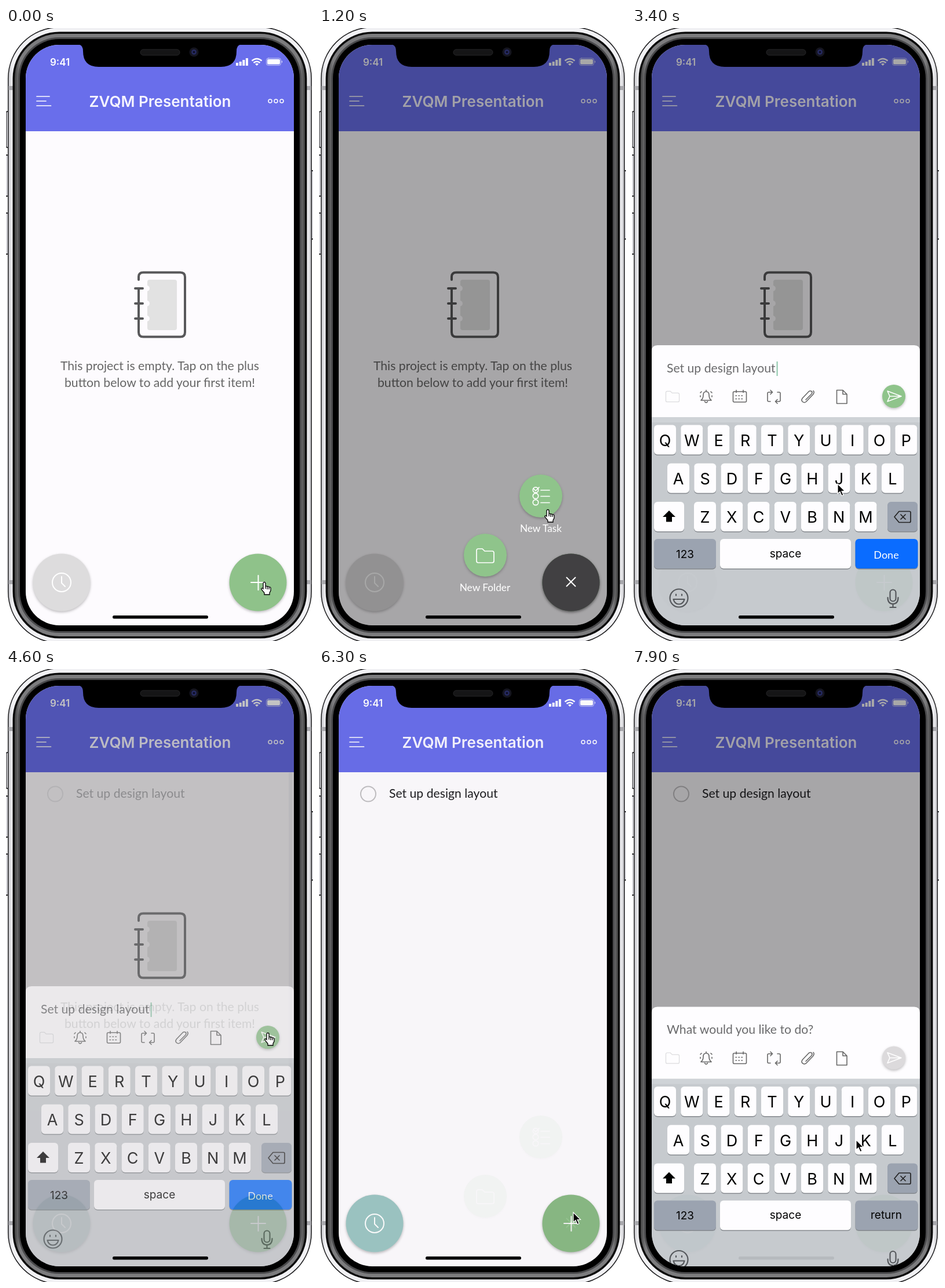
An HTML page that plays this animation: 530 px wide and 1057 px high, repeating every 8000 ms.

```html
<!DOCTYPE html>
<html lang="en">
<head>
<meta charset="utf-8">
<title>Add a task</title>
<style>
html, body { margin: 0; width: 100%; height: 100%; overflow: hidden; background: #fff; }
svg { display: block; width: 530px; height: 1057px; }
text { font: 21.2px Lato, sans-serif; white-space: pre; }
.mid { text-anchor: middle; }
.ui { font-family: Inter, sans-serif; }
.key { font-size: 27px; }
.small { font-size: 19px; }
.label { font-size: 17.3px; fill: #fff; }
.line { fill: none; stroke-width: 2; stroke-linecap: round; stroke-linejoin: round; }
.white { stroke: #fff; }
.thin { stroke-width: 1.6; stroke: #666; }
.lift { filter: drop-shadow(0 2px 2px rgba(0, 0, 0, .25)); }
</style>
</head>
<body>
<svg viewBox="0 0 530 1057">
  <defs>
    <clipPath id="glass"><rect x="34" y="29" width="463" height="1001" rx="58"/></clipPath>
    <linearGradient id="steel">
      <stop offset="0" stop-color="#c9c9cd"/><stop offset=".012" stop-color="#f1f1f4"/>
      <stop offset=".988" stop-color="#f1f1f4"/><stop offset="1" stop-color="#c9c9cd"/>
    </linearGradient>
    <linearGradient id="band">
      <stop offset="0" stop-color="#444"/><stop offset=".018" stop-color="#7c7c7e"/>
      <stop offset=".982" stop-color="#7c7c7e"/><stop offset="1" stop-color="#444"/>
    </linearGradient>
    <path id="folderIcon" d="M-15-9a3 3 0 0 1 3-3h7l4 4h13a3 3 0 0 1 3 3v14a3 3 0 0 1-3 3h-24a3 3 0 0 1-3-3z"/>
    <rect id="homeBar" x="184" y="1013" width="165" height="5.5" rx="2.7"/>
  </defs>

  <g id="body"></g>

  <g clip-path="url(#glass)">
    <rect x="34" y="29" width="463" height="1001" fill="#fdfbfe"/>
    <rect x="34" y="29" width="463" height="149" fill="#696eeb"/>
    <text class="ui" x="76" y="65" style="font-size:17px;font-weight:600" fill="#fff">9:41</text>
    <path d="M397 65v-5h4v5zM402.700 65v-7h4v7zM408.300 65v-10h4v10zM413.900 65v-13h4v13z" fill="#fff"/>
    <g class="line white" style="stroke-linecap:butt;stroke-width:2.600">
      <path d="M424.500 56.500q8.500-7 17 0M427.500 60q5.500-4.500 11 0"/>
      <path d="M433 65l-3-3q3-2 6 0z" fill="#fff" stroke="none"/>
    </g>
    <rect x="449.500" y="52" width="25" height="12.500" rx="3.500" class="line white" style="stroke-width:1" opacity=".6"/>
    <path d="M453 53.700h18q2 0 2 2v5q0 2-2 2h-18q-2 0-2-2v-5q0-2 2-2zM476 56q2 2 0 4.500z" fill="#fff"/>
    <path class="line white" style="stroke-width:1.700" d="M53 118h22M53 126h16M53 134h24.500"/>
    <g class="line white" style="stroke-width:1.500">
      <circle cx="456" cy="126" r="3"/><circle cx="466" cy="126" r="3"/><circle cx="476" cy="126" r="3"/>
    </g>
    <text class="ui mid" x="266" y="135.500" style="font-size:26px;font-weight:600" fill="#f6f4ff">ZVQM Presentation</text>

    <g id="empty">
      <rect x="244" y="434" width="51" height="87" rx="4" fill="#e2e2e2"/>
      <g fill="#fdfbfe"><circle cx="243" cy="449" r="5"/><circle cx="243" cy="475" r="5"/><circle cx="243" cy="501" r="5"/></g>
      <path class="line" stroke="#58585a" style="stroke-width:4" d="M229 434v-5q0-7.500 8-7.500h64q8 0 8 8v95q0 8-8 8h-64q-8 0-8-8v-75M223 449h13M223 475h13M223 501h13"/>
      <g class="mid" fill="#666">
        <text x="265.500" y="590">This project is empty. Tap on the plus</text>
        <text x="265.500" y="619">button below to add your first item!</text>
      </g>
    </g>

    <g id="list">
      <circle cx="85" cy="215.500" r="13" class="line" stroke="#c2c0c3"/>
      <text x="121" y="222" fill="#1d1d20">Set up design layout</text>
      <rect id="scroll" x="488" y="178" width="6" height="553" rx="3" fill="#dedde1"/>
    </g>

    <g class="lift">
      <circle cx="96" cy="956" r="49.500" fill="#dddcdd"/>
      <circle id="clock" cx="96" cy="956" r="49.500" fill="#9dc6c4"/>
    </g>
    <path class="line white" d="M80 956a16 16 0 1 1 32 0a16 16 0 1 1-32 0M96 946v11l6 6"/>
    <circle cx="435" cy="956" r="49.500" fill="#8fc28a" class="lift"/>
    <path class="line white" d="M423 956h25M435.500 944v25"/>
    <use href="#homeBar"/>

    <rect id="dim" x="34" y="29" width="463" height="1001" opacity="0"/>

    <g id="menu">
      <g class="lift">
        <circle cx="435" cy="956" r="49.500" fill="#414042"/>
        <circle cx="383" cy="807" r="37" fill="#8fc48b"/>
        <circle cx="287" cy="909" r="37" fill="#8fc48b"/>
      </g>
      <g class="line white">
        <path d="M427.500 947.500l15 15M442.500 947.500l-15 15"/>
        <g style="stroke-width:1.700">
          <circle cx="374" cy="796.500" r="4.700"/><circle cx="374" cy="807" r="4.700"/><circle cx="374" cy="818" r="4.700"/>
          <path d="M371 795l3 3 6-6M383 797h15M383 807.500h15M383 818.500h15"/>
          <use href="#folderIcon" x="287" y="910"/>
        </g>
      </g>
      <text class="label mid" x="383" y="869">New Task</text>
      <text class="label mid" x="286.500" y="971">New Folder</text>
    </g>

    <g id="panel">
      <path d="M34 680V557q0-10 10-10h443q10 0 10 10v123z" fill="#fefdff"/>
      <rect x="34" y="671" width="463" height="480" fill="#cacfd3" opacity=".9"/>
      <text id="entry" x="60" y="593.500" fill="#69696b"></text>
      <rect id="caret" y="575" width="2" height="25" fill="#8cc6aa"/>
      <g class="line thin">
        <use href="#folderIcon" transform="translate(70 635.500) scale(.77)" stroke="#dcdcde"/>
        <path d="M119 642q4-3 4-9q0-6 5-6t5 6q0 6 4 9zM125.500 644q2.500 4 5 0M128 627v-2.500M120 627l-2 2M136 627l2 2M118 634v2M138 634v2"/>
        <rect x="174.500" y="627" width="23" height="18" rx="2"/>
        <path d="M180 624.500v4M192 624.500v4"/>
        <path d="M179 634h15M179 639.500h15" stroke-dasharray="1.500 3.500"/>
        <path d="M248 644h6q2 0 2-2v-12q0-2-2-2h-3M242 628h-6q-2 0-2 2v12q0 2 2 2h3M239 624.500l3.500 3.500-3.500 3.500M251 640.500l-3.500 3.500 3.500 3.500"/>
        <path d="M300 641l10-10q2-3 0-4.500t-4.500 0l-11 11.500q-3 4 0 6.500t6 0l12-12.500q3-4 .5-6.500"/>
        <path d="M353.500 624.500h10.500l7 7v16h-17.500zM364 624.500v7h7"/>
      </g>
      <circle id="send" cx="452" cy="635" r="20" class="lift"/>
      <path class="line white" style="stroke-width:1.600" d="M441 626l24 9-24 9 4-9zM445 635h20"/>
      <g id="keys"></g>
      <path d="M64 832l11 11h-6v8.500h-10v-8.500h-6z"/>
      <path class="line" stroke="#222" style="stroke-width:1.700" d="M453 843l8-9.500h18q2 0 2 2v15q0 2-2 2h-18zM464 839l8 8M472 839l-8 8"/>
      <text class="ui small mid" x="91.500" y="914">123</text>
      <text class="ui small mid" x="265" y="912.500">space</text>
      <text id="action" class="mid" x="439"></text>
      <g class="line" stroke="#55585c" style="stroke-width:2.200">
        <circle cx="81" cy="983" r="15.500"/>
        <path d="M71.500 985h19q-2 8.500-9.500 8.500t-9.500-8.500zM76 976.500v2M86 976.500v2"/>
        <rect x="445.500" y="968.500" width="10" height="20" rx="5"/>
        <path d="M441.500 982q0 11 9 11t9-11M450.500 993v6M445.500 999h10"/>
      </g>
      <use href="#homeBar"/>
    </g>
  </g>

  <path d="M126 28.500Q133 30 133 40Q133 67 160 67H371Q398 67 398 40Q398 30 405 28.500z"/>
  <rect x="232" y="37" width="68" height="10" rx="5" fill="#151516" stroke="#262628"/>
  <circle cx="324.500" cy="41.500" r="8" fill="#15151f"/>
  <circle cx="324.500" cy="41.500" r="4.500" fill="#25295e"/>
  <circle cx="324.500" cy="41.500" r="1.800" fill="#0c0d20"/>

  <g id="cursor">
    <path id="arrow" d="M0 0V17L4 13.500L7 20.500L10 19.200L7 12.500H12.500Z" stroke="#fff" stroke-width="1.200"/>
    <path id="hand" d="M-2 11V1.500a2 2 0 0 1 4 0V7c1-1 3-1 3 .5 1-1 3-.5 3 .8 1-.8 3-.3 3 1.500V14l-2 4v3H0v-3l-5-6c-1-2 1-3 3-1zM2 7v4M5 8v4M8 9v3" fill="#fff" stroke="#000" stroke-width="1.300"/>
  </g>
</svg>

<script>
const $ = id => document.getElementById(id);
const ramp = (t, a, b) => Math.min(1, Math.max(0, (t - a) / (b - a)));
const easeInOut = p => p < .5 ? 2 * p * p : 1 - 2 * (1 - p) ** 2;
const fade = (id, value) => $(id).setAttribute('opacity', value);
const box = (x, y, w, h, r, fill, id = '') =>
  `<rect id="${id}" x="${x}" y="${y}" width="${w}" height="${h}" rx="${r}" fill="${fill}"/>`;

function buildBody() {
  const ring = (d, fill) => box(34 - d, 29 - d, 463 + 2 * d, 1001 + 2 * d, 58 + d, fill);
  const button = (x, y, h) => box(x, y, 5, h, 2, '#3a3a3c') + box(x + 1, y + 2, 3, h - 4, 1, '#d8d8dc');
  const antenna = y => box(4, y, 8, 7, 0, '#a9a9ad') + box(519, y, 8, 7, 0, '#a9a9ad');
  $('body').innerHTML =
    button(0, 143, 64) + button(-1, 218, 73) + button(-1, 318, 73) + button(526, 245, 120) +
    ring(31, '#1c1c1e') + ring(29.5, 'url(#steel)') + antenna(100) + antenna(952) +
    ring(22.5, '#0a0a0a') + ring(19, 'url(#band)') + ring(13, '#4a4a4c') + ring(10, '#000');
}

function buildKeys() {
  const key = (x, y, w, fill, id) =>
    box(x, y + 1.5, w, 51, 6, '#85898e') + box(x, y, w, 51, 6, fill, id);
  let out = '';
  ['QWERTYUIOP', 'ASDFGHJKL', 'ZXCVBNM'].forEach((row, r) => {
    const y = 684.5 + r * 66.2, start = [57, 80, 126][r];
    [...row].forEach((c, i) => {
      const x = start + i * 46.25;
      out += key(x - 19, y, 38, '#fefdff') + `<text class="ui key mid" x="${x}" y="${y + 36.5}">${c}</text>`;
    });
  });
  out += key(38, 817, 52, '#fefdff') + key(441, 817, 52, '#9ba3b0') +
    key(38, 881, 107, '#9ba3b0') + key(152, 881, 226, '#fefdff') + key(385.5, 881, 108, '#9ba3b0', 'enter');
  $('keys').innerHTML = out;
}

const PHRASE = 'Set up design layout';
const PATH = [[0, 446, 956], [200, 446, 956], [300, 440, 939], [1100, 400, 838], [1200, 395, 831],
  [1400, 394, 827], [1900, 387, 812], [2600, 355, 786], [3500, 355, 786], [4300, 452, 628],
  [5000, 452, 628], [6000, 446, 952], [6200, 445, 950], [6300, 439, 937], [7100, 403, 842],
  [7400, 396, 832], [7900, 387, 812], [8000, 386, 811]];
const HAND = [[0, 250], [950, 1450], [4250, 4650], [5950, 6250], [6950, 7450]];

function drawCursor(t) {
  const i = PATH.findIndex(p => p[0] > t);
  const [t0, x0, y0] = PATH[i - 1], [t1, x1, y1] = PATH[i];
  const p = ramp(t, t0, t1);
  $('cursor').setAttribute('transform', `translate(${x0 + (x1 - x0) * p} ${y0 + (y1 - y0) * p})`);
  const hand = HAND.some(([a, b]) => t >= a && t < b);
  fade('hand', hand ? 1 : 0);
  fade('arrow', hand ? 0 : 1);
}

function drawEntry(typed) {
  const active = typed > 0;
  $('entry').textContent = active ? PHRASE.slice(0, typed) : 'What would you like to do?';
  fade('caret', active ? 1 : 0);
  $('caret').setAttribute('x', 62 + $('entry').getComputedTextLength());
  $('send').setAttribute('fill', active ? '#8fc48b' : '#dcdadc');
  $('enter').setAttribute('fill', active ? '#0a6cff' : '#9ba3b0');
  const action = $('action');
  action.textContent = active ? 'Done' : 'return';
  action.setAttribute('class', active ? 'mid' : 'mid ui small');
  action.setAttribute('y', active ? 915 : 912.5);
  action.style.fontSize = active ? '18px' : '';
  action.setAttribute('fill', active ? '#fff' : '#000');
}

function draw(t) {
  const second = t >= 6000, u = second ? t - 6000 : t;
  const saved = ramp(t, 4500, 4820);
  const sheet = second ? 1 : 1 - saved;
  const opened = ramp(u, 280, 600);
  fade('empty', 1 - saved);
  fade('list', saved);
  fade('clock', saved);
  fade('scroll', 1 - ramp(t, 5200, 5500));
  fade('dim', .34 * opened * sheet);
  fade('menu', opened * (1 - ramp(u, 1400, 1600)));
  fade('panel', sheet);
  const slide = 1 - easeInOut(ramp(u, 1500, 1994));
  $('panel').setAttribute('transform', `translate(0 ${490 * slide})`);
  drawEntry(Math.min(PHRASE.length, Math.max(0, Math.floor((u - 2300) / 50))));
  drawCursor(t);
}

buildBody();
buildKeys();
const began = performance.now();
function tick() {
  const t = (performance.now() - began) % 8000;
  draw(Math.floor(t / 100) * 100);
  requestAnimationFrame(tick);
}
tick();
</script>
</body>
</html>
```
